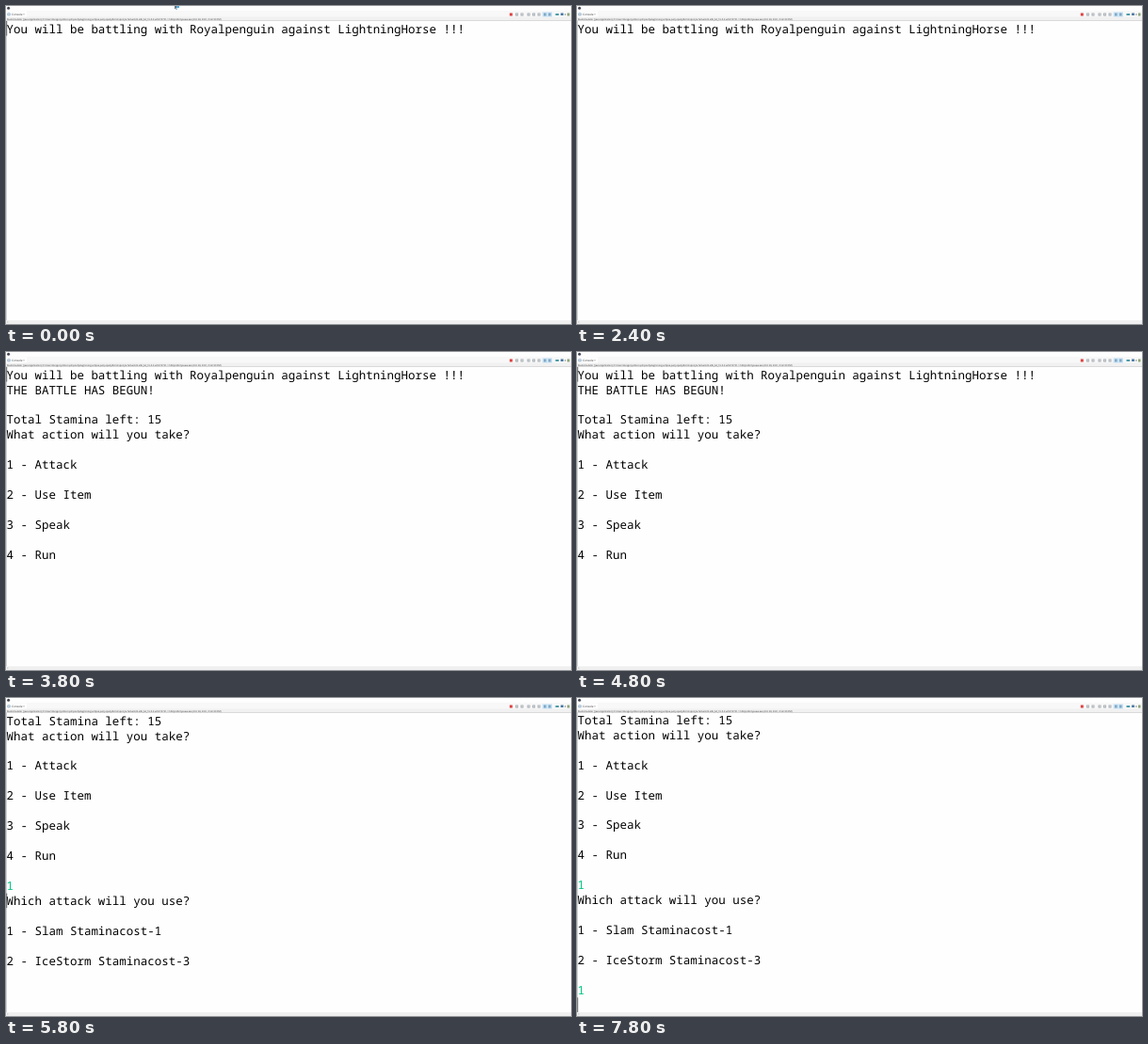
Animation, 600 px wide and 338 px high, one loop 8000 ms. Source, as an HTML page with a canvas:

```html
<!DOCTYPE html>
<html lang="en">
<head>
<meta charset="utf-8">
<title>Console battle</title>
<style>
html, body { margin: 0; width: 100%; height: 100%; overflow: hidden; background: #fefefe; }
canvas { display: block; width: 600px; height: 338px; }
</style>
</head>
<body>
<canvas id="stage"></canvas>
<script>
const LOOP = 8000, WIDTH = 600, HEIGHT = 338;
const MONO = '12.47px "Noto Sans Mono", monospace';
const ADVANCE = 7.48, PITCH = 15.96, GREEN = '#00c583';

const canvas = document.getElementById('stage');
const ctx = canvas.getContext('2d');
const ratio = window.devicePixelRatio || 1;
canvas.width = WIDTH * ratio;
canvas.height = HEIGHT * ratio;
ctx.scale(ratio, ratio);
ctx.textRendering = 'geometricPrecision';

const intro = ['You will be battling with Royalpenguin against LightningHorse !!!'];
const menu = ['Total Stamina left: 15', 'What action will you take?', '',
  '1 - Attack', '', '2 - Use Item', '', '3 - Speak', '', '4 - Run', ''];
const battle = [...intro, 'THE BATTLE HAS BEGUN!', '', ...menu];
const attacks = [...menu, '1', 'Which attack will you use?', '',
  '1 - Slam Staminacost-1', '', '2 - IceStorm Staminacost-3', ''];

// Each scene: start time, lines, caret row and column, top of the first row.
const scenes = [
  { at: 0, lines: intro, row: 0, col: 0 },
  { at: 2800, lines: battle, row: 0, col: 0 },
  { at: 5000, lines: [...battle, '1'], row: 14, col: 1 },
  { at: 5600, lines: [...battle, '1'], row: 15, col: 0 },
  { at: 5800, lines: attacks, row: 12, col: 0 },
  { at: 7600, lines: [...attacks, '1'], row: 18, col: 1 },
  { at: 7800, lines: [...attacks, '1'], row: 19, col: 0, top: 15.1 }
];
const caretOff = [[200, 800], [1200, 1800], [2400, 2800], [3200, 3800],
  [4400, 4800], [6200, 6800], [7400, 7600]];

function rect(x, y, w, h, color) {
  ctx.fillStyle = color;
  ctx.fillRect(x, y, w, h);
}

function label(text, x, y, font, color) {
  ctx.font = font;
  ctx.fillStyle = color;
  ctx.fillText(text, x, y);
}

function drawPointer(x, y) {
  rect(x, y, 2, 3, '#69737c');
  rect(x + 2, y, 3, 2, '#58a9d6');
  rect(x + 1, y + 2, 2, 2, '#a9c3d3');
}

function drawWindow() {
  rect(0, 0, WIDTH, HEIGHT, '#fefefe');
  rect(0, 5, WIDTH, 7, '#f8f8f8');
  rect(0, 5.5, 22, 6.5, '#ffffff');
  rect(0, 11.5, WIDTH, 4, '#f1f1f1');
  rect(0, 15, WIDTH, 0.6, '#c9c9c9');
  ctx.fillStyle = '#40444f';
  ctx.beginPath();
  ctx.arc(2.6, 2.3, 1.5, 0, 7);
  ctx.fill();
  rect(1.5, 7.5, 3, 2.7, '#6f93b4');
  rect(2, 8.2, 2, 1.3, '#e4edf4');
  label('Console', 6, 10.2, '3.1px "Open Sans", sans-serif', '#333');
  label('×', 18, 10.2, '3.5px "Open Sans", sans-serif', '#777');
  label('Duelsimulator [Java Application] C:\\Users\\Gregory Moss\\.p2\\pool\\plugins\\' +
    'org.eclipse.justj.openjdk.hotspot.jre.full.win32.x86_64_16.0.2.v20210721-1149' +
    '\\jre\\bin\\javaw.exe (Oct 28, 2021, 5:42:39 PM)',
    0.8, 14.5, '2.5px "Open Sans", sans-serif', '#333');

  rect(569.5, 6.5, 10.5, 5, '#c9e4f7');
  rect(534.8, 7.5, 3, 3, '#df3f3f');
  for (const x of [541, 546.5, 553.5, 559, 564.5]) {
    rect(x, 7.5, 3, 3, '#a7adb3');
    rect(x + 1, 8.3, 1.2, 1.2, '#e7e9eb');
  }
  for (const x of [571, 576]) rect(x, 7.5, 2.6, 3, '#83a9c4');
  rect(583.5, 8, 3.5, 2, '#4c9ba8');
  rect(589, 7.5, 3, 2.5, '#527fa8');
  rect(593.3, 8.5, 1.2, 1, '#555');
  rect(596, 7.5, 2.5, 3, '#8aa579');

  rect(0, 16, 0.6, 318, '#b5b5b5');
  rect(0, 334, WIDTH, 4, '#f0f0f0');
  label('‹', 1.3, 337.3, '4px "Open Sans", sans-serif', '#777');
}

function drawConsole(t) {
  const { lines, row, col, top = 16 } = scenes.filter(s => s.at <= t).pop();
  lines.forEach((line, i) => {
    const typed = line === '1';
    const editing = typed && i === row;
    label(line, 0.6, top + i * PITCH + 12.6,
      (editing ? 'bold ' : '') + MONO, typed ? GREEN : '#000');
  });
  if (!caretOff.some(([from, to]) => t >= from && t < to)) {
    rect(col ? col * ADVANCE + 0.6 : 0.2, top + row * PITCH, 1, 15.6, '#666');
  }
}

function draw(now) {
  const t = now % LOOP;
  drawWindow();
  if (t < 600) drawPointer(179, 0);
  else if (t < 800) drawPointer(114, 6);
  drawConsole(t);
}

const start = performance.now();
function tick() {
  draw(performance.now() - start);
  requestAnimationFrame(tick);
}
tick();
</script>
</body>
</html>
```
